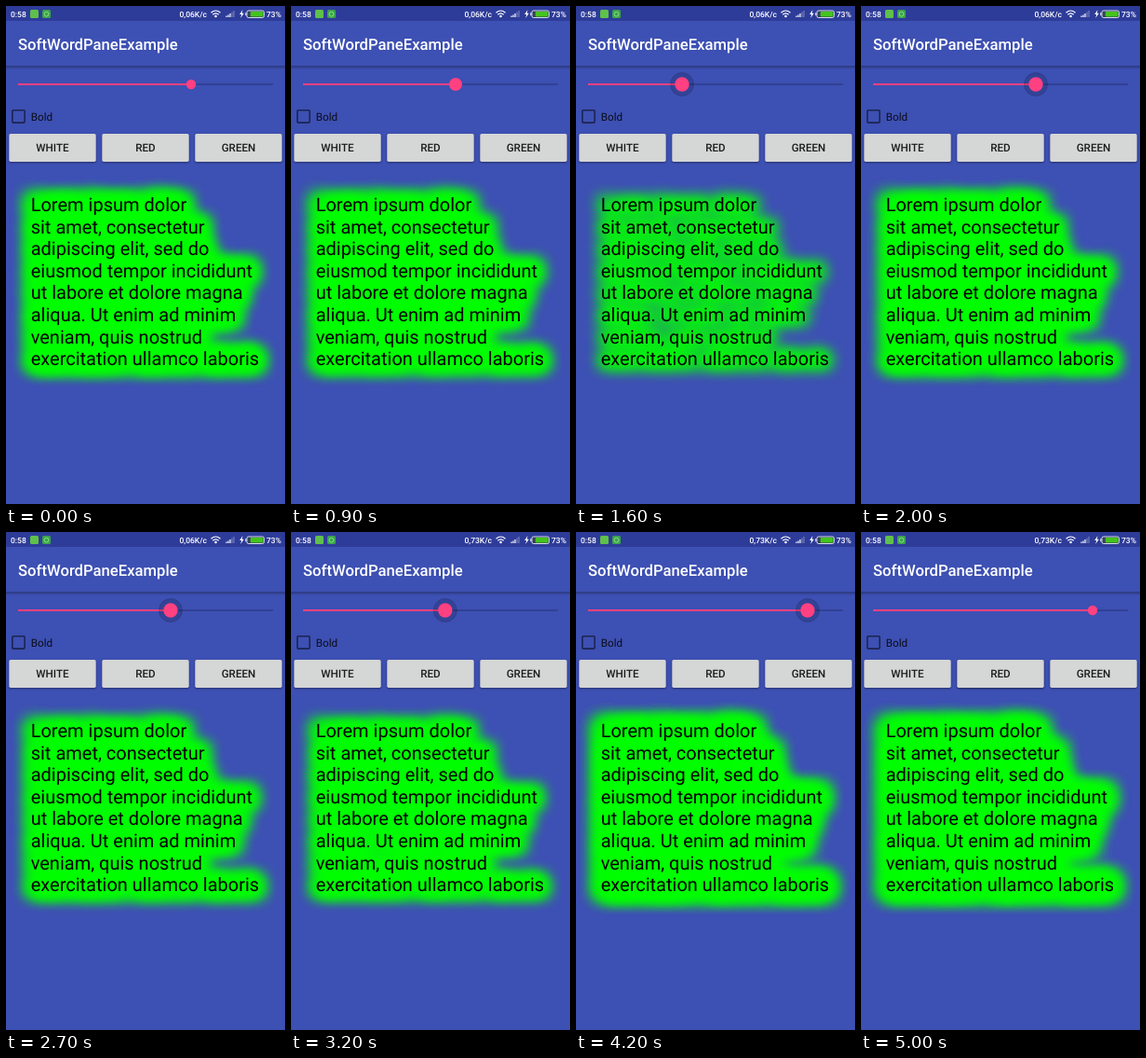
An HTML page for the animation above (5100 ms loop, 300x534 px).

```html
<!DOCTYPE html>
<html lang="en">
<head>
<meta charset="utf-8">
<title>Glowing text</title>
<style>
  html, body { margin: 0; width: 100%; height: 100%; overflow: hidden; background: #3d50b3; }
  svg { display: block; width: 300px; height: 534px; font-family: Roboto, "Liberation Sans", sans-serif; text-rendering: geometricPrecision; }
  .status { font-size: 8.5px; font-weight: 500; fill: #fff; }
  .title { font-size: 16.67px; font-weight: 500; fill: #fff; }
  .label { font-size: 11.67px; fill: #0b0d1a; }
  .button { font-size: 11.67px; font-weight: 500; fill: #1c1c1c; text-anchor: middle; }
  .copy { font-size: 20px; }
</style>
</head>
<body>
<svg viewBox="0 0 300 534">
  <defs>
    <filter id="halo" filterUnits="userSpaceOnUse" x="-40" y="140" width="380" height="320" color-interpolation-filters="sRGB">
      <feGaussianBlur id="soft" stdDeviation="9"/>
      <feComponentTransfer>
        <feFuncR type="discrete" tableValues="0"/>
        <feFuncG type="discrete" tableValues="1"/>
        <feFuncB type="discrete" tableValues="0"/>
        <feFuncA id="gain" type="table" tableValues="0 1"/>
      </feComponentTransfer>
    </filter>
    <filter id="shade" x="-10%" y="-30%" width="120%" height="160%">
      <feGaussianBlur stdDeviation="1.1"/>
    </filter>
    <linearGradient id="edge" x2="0" y2="1">
      <stop stop-color="#000" stop-opacity=".3"/>
      <stop offset="1" stop-color="#000" stop-opacity="0"/>
    </linearGradient>
  </defs>

  <rect width="300" height="534" fill="#3d50b3"/>
  <rect y="64" width="300" height="4" fill="url(#edge)"/>
  <rect width="300" height="16" fill="#2e3c99"/>

  <g class="status">
    <text x="5" y="11.7">0:58</text>
    <text id="rate" x="186.5" y="11.7"></text>
    <text x="280" y="11.7">73%</text>
  </g>
  <rect x="26" y="4" width="9" height="9" rx="1.5" fill="#5fc04a"/>
  <rect x="39" y="4" width="9" height="9" rx="1.5" fill="#3ba34c"/>
  <circle cx="43.5" cy="8.7" r="2.4" fill="none" stroke="#8ce07c"/>
  <g fill="none" stroke="#fff" stroke-width="1.2">
    <path d="M220.5 7.2Q225.5 2.8 230.5 7.2M222.3 9.2Q225.5 6.4 228.7 9.2"/>
    <circle cx="225.5" cy="11" r=".7" fill="#fff"/>
    <path d="M237 12v-1.5M239 12v-2.5M241 12v-4"/>
    <path d="M243 12v-5.5M245 12v-7" opacity=".35"/>
  </g>
  <path d="M254.5 4l-3.3 5h2l-1 4 3.6-5.2h-2.1z" fill="#fff"/>
  <rect x="259" y="5" width="18.5" height="7.5" rx="1.8" fill="#35405f" stroke="#e8ecf4" stroke-width=".9"/>
  <rect x="262.8" y="6" width="13.8" height="5.5" rx="1" fill="#43c41c"/>
  <rect x="257.3" y="7.2" width="1.2" height="3" fill="#e8ecf4"/>

  <text class="title" x="13" y="47">SoftWordPaneExample</text>

  <path d="M13 84H287" stroke="#2f3d8b" stroke-width="1.7"/>
  <path id="filled" stroke="#f9417f" stroke-width="1.8"/>
  <g id="knob">
    <circle id="ripple" r="12.5" fill="#000" fill-opacity=".16" stroke="#000" stroke-opacity=".14"/>
    <circle id="thumb" fill="#ff4081"/>
  </g>

  <rect x="6.8" y="111.8" width="13.3" height="13.3" rx="1" fill="none" stroke="#1b2450" stroke-width="1.6"/>
  <text class="label" x="26.8" y="122.7">Bold</text>

  <g id="buttons"></g>

  <g id="glow" class="copy" filter="url(#halo)" fill="#0f0" stroke="#0f0" stroke-width="3" stroke-linejoin="round"></g>
  <g id="copy" class="copy" fill="#000"></g>
</svg>
<script>
const LOOP = 5100, STEP = 100;
const COPY = [
  "Lorem ipsum dolor", "sit amet, consectetur", "adipiscing elit, sed do",
  "eiusmod tempor incididunt", "ut labore et dolore magna",
  "aliqua. Ut enim ad minim", "veniam, quis nostrud", "exercitation ullamco laboris"
];
// [time, value] pairs, linear in between
const SLIDE = [[0, 199], [800, 199], [900, 177], [1100, 160], [1400, 121], [1600, 114],
  [1700, 123], [2000, 188], [2300, 216], [2400, 226], [2700, 177], [2950, 148],
  [3100, 152], [3600, 221], [3900, 243], [4100, 249], [LOOP, 249]];
const RADIUS = [[0, 5.2], [800, 5.2], [900, 7], [1000, 7.7], [4200, 7.7], [4400, 5.2], [LOOP, 5.2]];
const RIPPLE = [[0, 0], [900, 0], [1100, 1], [4200, 1], [4600, 0], [LOOP, 0]];
const LIFT = [[0, 0], [4800, 0], [5000, 1], [LOOP, 1]];

const $ = id => document.getElementById(id);
const set = (id, attrs) => {
  for (const key in attrs) $(id).setAttribute(key, attrs[key]);
};

function at(track, t) {
  const i = track.findIndex(([time]) => time > t);
  const [t0, a] = track[i - 1], [t1, b] = track[i];
  return a + (b - a) * (t - t0) / (t1 - t0);
}

// Opacity curve of n identical layers stacked on each other
const stacked = n => Array.from({ length: 86 }, (_, i) => (1 - (1 - i / 85) ** n).toFixed(4)).join(" ");

const lines = COPY.map((line, i) => `<text x="26.7" y="${220 + i * 23.61}">${line}</text>`).join("");
$("glow").innerHTML = $("copy").innerHTML = lines;

$("buttons").innerHTML = ["WHITE", "RED", "GREEN"].map((name, i) => {
  const x = 3.3 + i * 100;
  const box = `x="${x}" width="93.4" height="30" rx="1.7"`;
  return `<rect id="shadow${i}" ${box} y="138" filter="url(#shade)" opacity=".4"/>
    <rect ${box} y="137" fill="#d5d6d6"/>
    <text class="button" x="${x + 46.7}" y="156.3">${name}</text>`;
}).join("");

function draw(t) {
  const x = at(SLIDE, t), lift = at(LIFT, t), grow = x - 114;
  set("filled", { d: `M13 84H${x}` });
  set("knob", { transform: `translate(${x} 84)` });
  set("thumb", { r: at(RADIUS, t) });
  set("ripple", { opacity: at(RIPPLE, t) });
  set("soft", { stdDeviation: 8 + grow * .0145 });
  set("gain", { tableValues: stacked(3 + grow * .088) });
  set("shadow1", { opacity: .4 + lift * .15 });
  $("rate").textContent = t < 3000 ? "0,06K/c" : "0,73K/c";
}

function tick() {
  const t = performance.now() % LOOP;
  draw(Math.floor(t / STEP) * STEP);
  requestAnimationFrame(tick);
}
tick();
</script>
</body>
</html>
```
